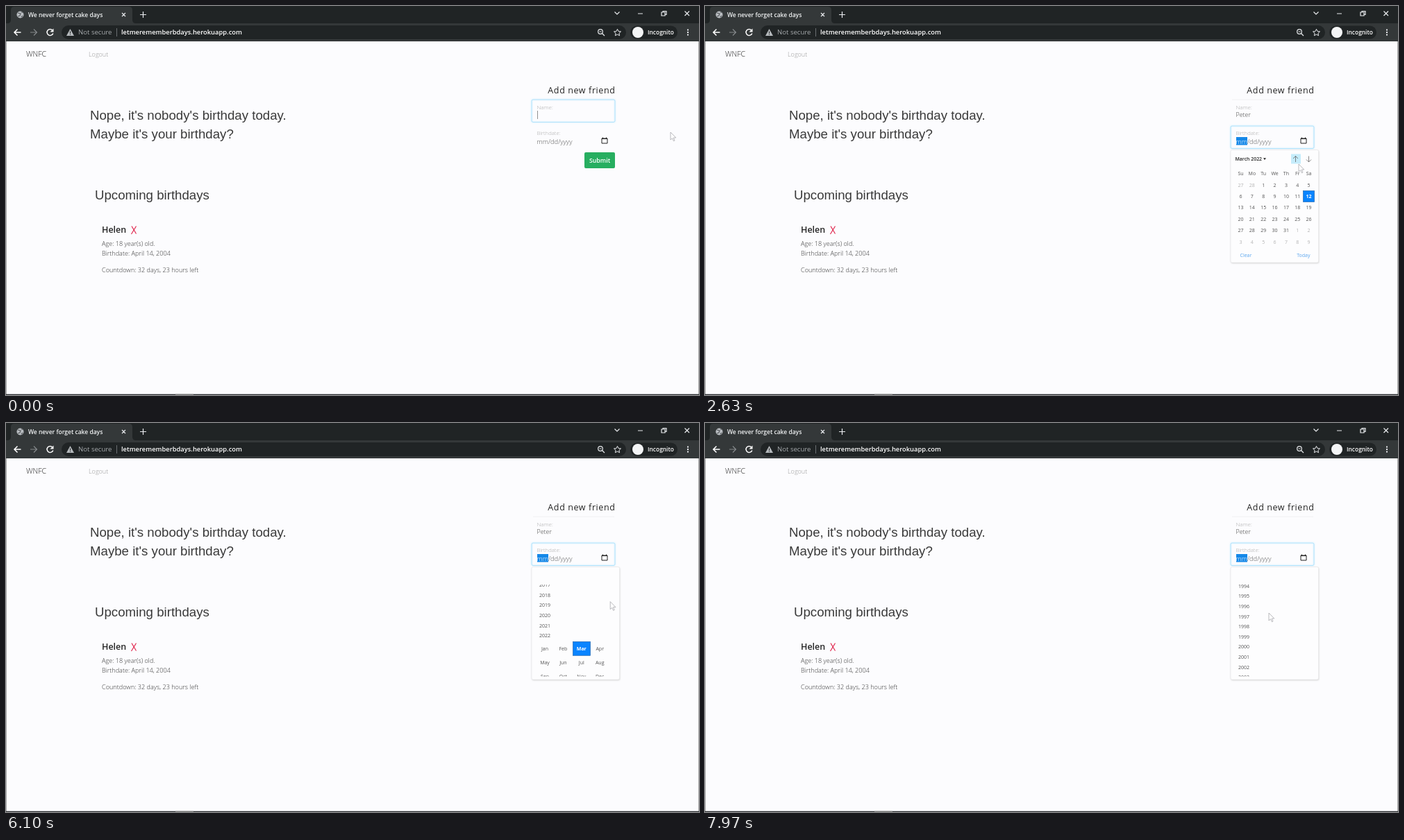
Write an HTML page that moves like this. It is 998x561 px and loops after 8000 ms.

```html
<!DOCTYPE html>
<html lang="en">
<head>
<meta charset="utf-8">
<title>Birthday list</title>
<style>
  html, body { margin: 0; height: 100%; overflow: hidden; background: #fcfcfe; }
  svg { display: block; width: 100vw; height: 100vh; font: 300 9.1px "Open Sans", "Noto Sans", sans-serif; }
  text { white-space: pre; }
  .head { font: 18.67px "Liberation Sans", Arial, sans-serif; fill: #3a3a3a; }
  .ui { fill: none; stroke: #e8eaed; stroke-width: 1.2; }
  .mid { text-anchor: middle; }
  .small { font-size: 7px; font-weight: 400; fill: #555; }
  .blue { fill: #5ba6ee; }
  .chosen { fill: #fff; font-weight: 700; }
  .dim { fill: #b4b4b4; }
  .strong { fill: #222; font-weight: 600; }
</style>
</head>
<body>
<svg viewBox="0 0 998 561" preserveAspectRatio="none">
  <defs>
    <clipPath id="listClip"><rect x="758" y="233" width="125" height="132.5"/></clipPath>
    <filter id="soft" x="-10%" y="-10%" width="120%" height="120%"><feGaussianBlur stdDeviation="1"/></filter>
  </defs>

  <!-- browser bar -->
  <rect width="998" height="51" fill="#202425"/>
  <rect y="25" width="998" height="26" fill="#343839"/>
  <path d="M2 25Q7 25 7 20V6Q7 1 12 1H177Q182 1 182 6V20Q182 25 187 25Z" fill="#343839"/>
  <circle cx="20.5" cy="12.5" r="5" fill="#b9bdc1"/>
  <path d="M17 10l4 1-1 3-3 1M22 8.500l2 1M22 16l2-2" class="ui" style="stroke:#55595c"/>
  <text x="32" y="15.500" font-size="8.5" font-weight="600" fill="#f1f3f4">We never forget cake days</text>
  <path d="M167 10l5 5m0-5l-5 5M193 12.500h9M197.500 8v9M876.500 8.500l3.500 3.500 3.500-3.500M910 11h7M977.500 7.500l6.500 6.500m0-6.500l-6.500 6.500" class="ui"/>
  <path d="M944 9h5v5h-5zM946 9V7.500h5v5h-2" class="ui"/>
  <path d="M21.500 38H12m4.500-4.500L12 38l4.500 4.500" class="ui" style="stroke:#fff;stroke-width:1.5"/>
  <path d="M35 38h9.500M40 33.500l4.500 4.500-4.500 4.500" class="ui" style="stroke:#85898c"/>
  <path d="M67 35a4.500 4.500 0 1 0 .8 4.500" class="ui" style="stroke:#fff;stroke-width:1.5"/>
  <path d="M68.500 32.500v5h-5z" fill="#fff"/>
  <rect x="80" y="28" width="813" height="20" rx="10" fill="#202425"/>
  <path d="M92.500 33l5.500 10H87z" fill="#b5b9bc"/>
  <path d="M92.500 36.500v3M92.500 40.500v1.200" class="ui" style="stroke:#202425;stroke-width:1"/>
  <text x="104" y="41.300" font-size="9.6" font-weight="400" fill="#a6aaad">Not secure</text>
  <path d="M159.500 32v12" class="ui" style="stroke:#6b6f72;stroke-width:1"/>
  <text x="166" y="41.300" font-size="9.35" font-weight="600" fill="#fff">letmerememberbdays.herokuapp.com</text>
  <circle cx="856" cy="37" r="3.300" class="ui"/>
  <path d="M858.500 39.500l3.500 3.500M854.500 37h3" class="ui"/>
  <path d="M880.500 33.300l1.500 3.200 3.500.4-2.600 2.400.7 3.400-3.100-1.700-3.100 1.700.7-3.400-2.600-2.400 3.500-.4z" class="ui" style="stroke-width:1"/>
  <rect x="899" y="28.500" width="68" height="19" rx="9.500" fill="#202425"/>
  <circle cx="910" cy="38" r="8" fill="#f4f5f6"/>
  <text x="924" y="41" font-size="8.4" font-weight="600" fill="#fff">Incognito</text>
  <path d="M982 33.500v2M982 37v2M982 40.500v2" class="ui" style="stroke-width:2"/>

  <!-- page -->
  <path d="M.3 51V561M997.700 51V561" stroke="#555" stroke-width=".6"/>
  <path d="M0 560.400H998" stroke="#2b2e30" stroke-width="1.200"/>
  <path d="M244 560.400h26" stroke="#777" stroke-width="1.200"/>
  <text x="29" y="72.500" font-size="10.7" fill="#222">WNFC</text>
  <text x="119" y="72.500" font-size="9" fill="#999">Logout</text>
  <text x="121" y="163.500" class="head">Nope, it's nobody's birthday today.</text>
  <text x="121" y="190.500" class="head">Maybe it's your birthday?</text>
  <text x="128" y="279" class="head">Upcoming birthdays</text>
  <text x="138" y="327" font-size="12.500" class="strong">Helen</text>
  <path d="M181 317.500l6.500 11M187.500 317.500l-7 11.500" stroke="#e0284f" stroke-width="1.200"/>
  <g fill="#333">
    <text x="138" y="346">Age: 18 year(s) old.</text>
    <text x="138" y="360">Birthdate: April 14, 2004</text>
    <text x="138" y="383.500">Countdown: 32 days, 23 hours left</text>
  </g>

  <!-- form -->
  <text x="877.500" y="126" font-size="12.500" font-weight="400" letter-spacing=".6" text-anchor="end" fill="#222">Add new friend</text>
  <path d="M759 135H876" stroke="#f0f0f2"/>
  <path id="plainBox" d="M760 172.500H875.500Q877 172.500 877 174V205.500Q877 207 875.500 207H760" fill="none" stroke="#d9d9dc"/>
  <g id="focusBox" fill="none">
    <rect x="757" y="135" width="120" height="32.500" rx="2" stroke="#e0f4ff" stroke-width="2" filter="url(#soft)"/>
    <rect x="757" y="135" width="120" height="32.500" rx="2" stroke="#a9dffb" stroke-width=".9"/>
  </g>
  <text x="764.500" y="148.500" font-size="8" fill="#aaa">Name:</text>
  <text id="name" x="764.500" y="160" fill="#444" font-size="8.9"></text>
  <path id="caret" d="M0 151V163" stroke="#777" stroke-width=".8"/>
  <text id="dateLabel" x="764.500" y="186.300" font-size="7.700">Birthdate:</text>
  <rect id="mark" x="765" y="189" width="16" height="11.500" fill="#1588e8"/>
  <text x="764.500" y="198.500" font-size="9.300" fill="#555"><tspan id="mm">mm</tspan>/dd/yyyy</text>
  <path d="M858 191h8v7h-8zM858 191.500h8M859.500 189.500v1.500M864.500 189.500v1.500" fill="none" stroke="#222"/>
  <rect x="833" y="211" width="44" height="23" rx="2" fill="#27ae60"/>
  <text x="855" y="226.300" font-size="8.800" font-weight="600" class="mid" fill="#fff">Submit</text>

  <!-- date picker -->
  <g id="popup">
    <rect x="757.500" y="208.500" width="126.500" height="162.500" rx="2" fill="#ccc" filter="url(#soft)"/>
    <rect x="757" y="207.500" width="126.500" height="162.500" rx="2" fill="#fdfdfe" stroke="#e8e8ea" stroke-width=".7"/>
    <g id="days">
      <rect id="hover" x="844" y="213.500" width="14" height="14" fill="#c5ecfb"/>
      <text x="763.500" y="222.800" font-size="6.900" class="strong">March 2022</text>
      <path d="M804 219.300h4l-2 2.600z" fill="#222"/>
      <path d="M850.500 225v-8.500m-3.500 3.500l3.500-3.500 3.500 3.500M869.500 216.500v8.500m-3.500-3.500l3.500 3.500 3.500-3.500" fill="none" stroke="#666" stroke-width=".8"/>
      <text x="770.500" y="361.500" class="small blue">Clear</text>
      <text x="871.500" y="361.500" text-anchor="end" class="small blue">Today</text>
    </g>
    <g id="years" clip-path="url(#listClip)"><g id="list"></g></g>
  </g>
  <path id="cursor" d="M0 0V11L2.600 8.700 4.400 12.700 6 12 4.300 8H7.800Z" fill="#fff" stroke="#a8a8ac" stroke-width=".8"/>
</svg>
<script>
const LOOP = 8000, ROW = 14.63;
const $ = id => document.getElementById(id);

function add(parent, tag, attrs, text = '') {
  const el = document.createElementNS('http://www.w3.org/2000/svg', tag);
  for (const key in attrs) el.setAttribute(key, attrs[key]);
  el.textContent = text;
  parent.append(el);
}
const label = (parent, x, y, text, cls = '') =>
  add(parent, 'text', { x, y: y + 2.5, class: 'mid small ' + cls }, text);
const box = (parent, x, y, width, height) =>
  add(parent, 'rect', { x, y, width, height, fill: '#0a84ff', stroke: '#2468b0', 'stroke-width': .7 });

// Month grid
const days = $('days'), list = $('list');
box(days, 861.5, 266.5, 16, 16);
['Su', 'Mo', 'Tu', 'We', 'Th', 'Fr', 'Sa'].forEach((d, i) => label(days, 771.5 + i * 16.35, 241.5, d));
for (let i = 0; i < 42; i++) {
  const date = new Date(2022, 1, 27 + i), inMonth = date.getMonth() === 2, n = date.getDate();
  const cls = !inMonth ? 'dim' : n === 12 ? 'chosen' : '';
  label(days, 771.5 + i % 7 * 16.35, 258 + Math.floor(i / 7) * 16.4, n, cls);
}

// Year list, with the months of 2022 unfolded
for (let y = 1985; y <= 2026; y++)
  label(list, 776, y > 2022 ? 314.5 + (y - 2023) * ROW : 240 + (y - 2022) * ROW, y);
box(list, 816.5, 248.5, 25, 20);
'Jan Feb Mar Apr May Jun Jul Aug Sep Oct Nov Dec'.split(' ').forEach((m, i) =>
  label(list, 776 + i % 4 * 26.4, 258.5 + Math.floor(i / 4) * 20, m, i === 2 ? 'chosen' : ''));

// [time, x, y]
const path = [
  [0, 957, 182], [900, 957, 182], [1500, 992, 176], [1640, 992, 176], [1770, 950, 179],
  [2080, 861, 189], [2200, 861, 189], [2600, 855, 228], [2900, 855, 228], [3600, 802, 222],
  [4600, 802, 222], [5350, 873, 303], [5600, 873, 303], [6200, 870, 254], [6700, 870, 254],
  [7400, 829, 264], [7850, 829, 264], [7970, 812, 274], [8000, 812, 274]
];
// [start, distance] of each wheel turn
const turns = [[5750, 66.8], [6150, 66.8], [6680, 67.8], [6960, 67.8], [7250, 67.8], [7580, 67.8]];

const ease = p => { p = Math.min(1, Math.max(0, p)); return p * p * (3 - 2 * p); };
const show = (id, on) => $(id).setAttribute('visibility', on ? 'inherit' : 'hidden');
const move = (id, x, y) => $(id).setAttribute('transform', `translate(${x} ${y})`);

function draw(t) {
  const typing = t < 1450, open = t >= 2130, months = t >= 4560;
  $('name').textContent = 'Peter'.slice(0, Math.max(0, Math.floor((t - 350) / 150)));
  show('caret', typing && (t % 1000 < 500 || t > 500 && t < 1100));
  move('caret', 765.5 + $('name').getComputedTextLength(), 0);

  show('focusBox', typing || open);
  move('focusBox', 0, open ? 38 : 0);
  show('plainBox', !typing && !open);
  $('dateLabel').setAttribute('fill', typing || open ? '#aaa' : '#666');
  show('mark', open);
  $('mm').setAttribute('fill', open ? '#fff' : '#555');

  show('popup', open);
  show('days', open && !months);
  show('years', months);

  let k = 1;
  while (path[k][0] <= t) k++;
  const [t0, x0, y0] = path[k - 1], [t1, x1, y1] = path[k];
  const p = ease((t - t0) / (t1 - t0)), x = x0 + (x1 - x0) * p, y = y0 + (y1 - y0) * p;
  move('cursor', x, y);
  show('hover', open && !months && x > 843 && x < 859 && y > 212 && y < 230);
  move('list', 0, turns.reduce((sum, [start, d]) => sum + d * ease((t - start) / 160), 0));
}

let began;
function tick(now) {
  began ??= now;
  draw((now - began) % LOOP);
  requestAnimationFrame(tick);
}
draw(0);
requestAnimationFrame(tick);
</script>
</body>
</html>
```
